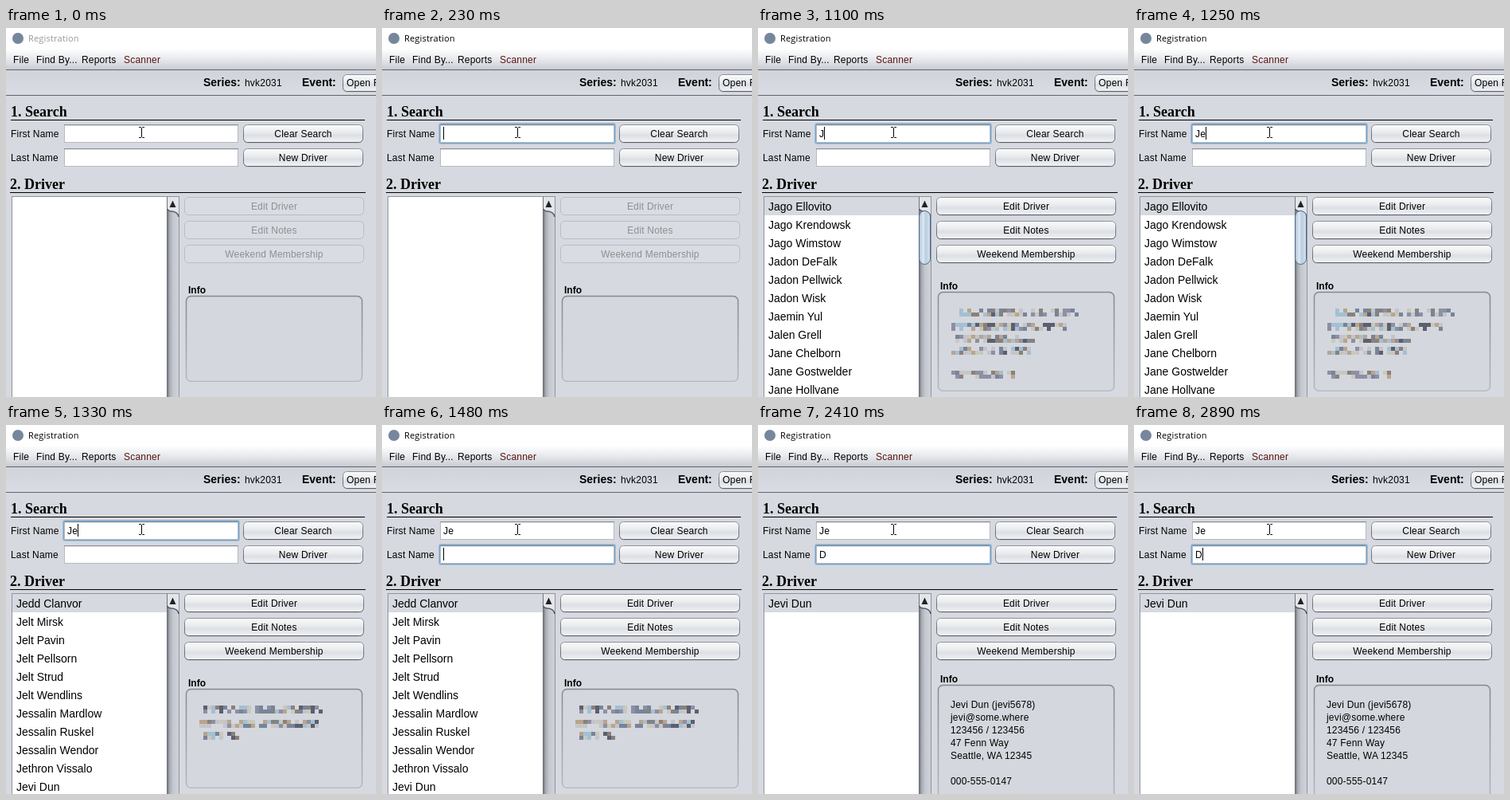
Animation, 465 px wide and 463 px high, one loop 3190 ms. Source, as an HTML page:

```html
<!DOCTYPE html>
<html lang="en">
<head>
<meta charset="utf-8">
<title>Registration</title>
<style>
html, body { margin: 0; width: 100%; height: 100%; overflow: hidden; background: #d6d9df; }
svg { display: block; width: 465px; height: 463px; }
text { font: 12px "Liberation Sans", Arial, sans-serif; letter-spacing: .2px; white-space: pre; }
.title { font: 11px "Open Sans", "Noto Sans", sans-serif; }
.big { font-size: 14px; letter-spacing: 0; }
.bold { font-weight: bold; letter-spacing: 0; }
.head { font: bold 18px "Liberation Serif", Times, serif; letter-spacing: 0; }
.mid { text-anchor: middle; }
.off { fill: #8e8f91; }

/* every change is a hard cut inside one 3190 ms loop */
.a { animation: 3190ms step-end infinite; }
.title { animation-name: title; }
.ring1 { animation-name: ring1; }
.ring2 { animation-name: ring2; }
.caret { animation-name: caret; }
.found { animation-name: found; }
.empty { animation-name: empty; }
.second { animation-name: second; }
.last { animation-name: last; }
.wide { animation-name: wide; }
.narrow { animation-name: narrow; }
.frame { animation-name: frame; }
.label { animation-name: label; }
@keyframes title { 0% { fill: #999 } 7.21%, 100% { fill: #000 } }
@keyframes ring1 { 0% { opacity: 0 } 7.21% { opacity: 1 } 46.394%, 100% { opacity: 0 } }
@keyframes ring2 { 0% { opacity: 0 } 46.394%, 100% { opacity: 1 } }
@keyframes found { 0% { opacity: 0 } 34.482%, 100% { opacity: 1 } }
@keyframes empty { 0% { opacity: 1 } 34.482%, 100% { opacity: 0 } }
@keyframes second { 0% { opacity: 0 } 39.184%, 100% { opacity: 1 } }
@keyframes last { 0% { opacity: 0 } 58.934%, 100% { opacity: 1 } }
@keyframes wide { 0% { opacity: 0 } 34.482% { opacity: 1 } 41.692%, 100% { opacity: 0 } }
@keyframes narrow { 0% { opacity: 0 } 41.692% { opacity: 1 } 58.934%, 100% { opacity: 0 } }
@keyframes caret {
  0% { opacity: 0; transform: translate(77px, 124px) }
  7.21% { opacity: 1; transform: translate(77px, 124px) }
  21.943% { opacity: 0; transform: translate(77px, 124px) }
  34.482% { opacity: 1; transform: translate(83px, 124px) }
  39.184% { opacity: 1; transform: translate(90px, 124px) }
  46.394% { opacity: 1; transform: translate(77px, 154px) }
  58.934% { opacity: 1; transform: translate(86px, 154px) }
  75.548% { opacity: 0; transform: translate(86px, 154px) }
  90.595%, 100% { opacity: 1; transform: translate(86px, 154px) }
}
@keyframes frame {
  0% { y: 336.5px; height: 107px }
  34.482% { y: 331.5px; height: 124px }
  58.934%, 100% { y: 326.5px; height: 150px }
}
@keyframes label {
  0% { transform: none }
  34.482% { transform: translateY(-5px) }
  58.934%, 100% { transform: translateY(-10px) }
}
</style>
</head>
<body>
<svg viewBox="0 0 465 463">
  <defs>
    <linearGradient id="menu" x2="0" y2="1">
      <stop stop-color="#fdfdfe"/><stop offset=".5" stop-color="#e6e8ec"/><stop offset="1" stop-color="#c9ccd2"/>
    </linearGradient>
    <linearGradient id="bar" x2="0" y2="1">
      <stop stop-color="#d0d3d9"/><stop offset="1" stop-color="#d9dce2"/>
    </linearGradient>
    <linearGradient id="btn" x2="0" y2="1">
      <stop stop-color="#fbfbfc"/><stop offset=".45" stop-color="#e8eaed"/>
      <stop offset=".6" stop-color="#dcdfe4"/><stop offset="1" stop-color="#f1f3f6"/>
    </linearGradient>
    <linearGradient id="edge" x2="0" y2="1">
      <stop stop-color="#8f9298"/><stop offset="1" stop-color="#5c5f65"/>
    </linearGradient>
    <linearGradient id="sunk" x2="0" y2="1">
      <stop stop-color="#85888e"/><stop offset="1" stop-color="#b4b7bd"/>
    </linearGradient>
    <linearGradient id="track">
      <stop stop-color="#747880"/><stop offset=".2" stop-color="#a9adb5"/>
      <stop offset=".5" stop-color="#c5c8cf"/><stop offset="1" stop-color="#cfd2d8"/>
    </linearGradient>
    <linearGradient id="thumb">
      <stop stop-color="#a9bed2"/><stop offset=".35" stop-color="#dde8f2"/>
      <stop offset=".6" stop-color="#bacde0"/><stop offset="1" stop-color="#d6e4f1"/>
    </linearGradient>
  </defs>

  <rect width="465" height="463" fill="#d6d9df"/>
  <rect width="465" height="27" fill="#fff"/>
  <circle cx="15" cy="13" r="7" fill="#76869d"/>
  <text class="title a" x="28" y="17">Registration</text>

  <rect y="27" width="465" height="25" fill="url(#menu)"/>
  <rect y="52" width="465" height="1" fill="#62656b"/>
  <text x="9" y="44">File</text>
  <text x="38" y="44">Find By...</text>
  <text x="95" y="44">Reports</text>
  <text x="148" y="44" fill="#5a1512">Scanner</text>

  <rect y="53" width="465" height="31" fill="url(#bar)"/>
  <rect y="84" width="465" height="1" fill="#62656b"/>
  <text class="big bold" x="248" y="73">Series:</text>
  <text x="300" y="73">hvk2031</text>
  <text class="big bold" x="372" y="73">Event:</text>

  <text class="head" x="6" y="111">1. Search</text>
  <rect x="6" y="115" width="445" height="1"/>
  <text x="6" y="137">First Name</text>
  <text x="6" y="167">Last Name</text>
  <text class="head" x="5" y="202">2. Driver</text>
  <rect x="5" y="206" width="447" height="1"/>

  <g id="widgets"></g>

  <text class="found a" x="77" y="137">J</text>
  <text class="second a" x="83.2" y="137">e</text>
  <text class="last a" x="77" y="167">D</text>
  <rect class="caret a" width="1" height="16"/>
  <path d="M167 124.5h2.5l1 1l1 -1h2.5M170.5 125.5v11M167 137.5h2.5l1 -1l1 1h2.5" fill="none" stroke="#000"/>

  <!-- driver list -->
  <rect x="7.5" y="211.5" width="210" height="260" fill="#fff" stroke="#8f949d"/>
  <rect class="found a" x="8" y="212" width="195" height="23" fill="#d6d9df"/>
  <rect x="203" y="212" width="14" height="251" fill="url(#track)"/>
  <rect x="202" y="212" width="1" height="251" fill="#70747c"/>
  <path d="M203 212H217V237Q216 230.5 208 230Q203 229.5 203 226Z" fill="#e3e5ea"/>
  <path d="M203 227Q203 229.5 208 230Q216 230.5 217 237" fill="none" stroke="#565a61" stroke-width="1.5"/>
  <path d="M205.500 225L209.5 216.5L213.500 225Z" fill="#222"/>
  <rect class="wide a" x="202.5" y="229.5" width="14" height="67" rx="7" fill="url(#thumb)" stroke="#4d6885"/>
  <g id="lists"></g>

  <!-- info panel -->
  <text class="label a bold" x="229" y="333">Info</text>
  <g transform="translate(0 1)">
    <rect class="frame a" x="226.5" width="221" rx="6" fill="none" stroke="#e6e8ec"/>
  </g>
  <rect class="frame a" x="226.5" width="221" rx="6" fill="#d4d7dd" stroke="url(#sunk)" stroke-width="1.5"/>
  <g id="info"></g>
</svg>

<script>
const put = (id, html) => { document.getElementById(id).innerHTML = html; };
const group = (cls, html) => `<g class="${cls} a">${html}</g>`;
const lines = (rows, x, y, step, cls = "") =>
  rows.map((s, i) => s && `<text class="${cls}" x="${x}" y="${y + i * step}">${s}</text>`).join("");

function plate(x, y, w, h, off) {
  const box = `x="${x + .5}" y="${y + .5}" width="${w - 1}" height="${h - 1}" rx="5"`;
  return off
    ? `<rect ${box} fill="#d9dce2" stroke="#b9bcc3"/>`
    : `<rect x="${x + 1}" y="${y + 2}" width="${w - 2}" height="${h - 1}" rx="5" fill="#c6c9cf"/>
       <rect ${box} fill="url(#btn)" stroke="url(#edge)"/>`;
}

const button = (x, y, w, text, off) => plate(x, y, w, 23, off) +
  `<text class="mid ${off ? "off" : ""}" x="${x + w / 2}" y="${y + 16}">${text}</text>`;

function field(y, ring) {
  const glow = (d, alpha) => `<rect x="${73.5 - d}" y="${y + .5 - d}" width="${218 + 2 * d}"
    height="${22 + 2 * d}" rx="${d}" fill="none" stroke="#73a4d1" stroke-opacity="${alpha}"/>`;
  return `<rect x="73.5" y="${y + .5}" width="218" height="22" fill="#fff" stroke="#b7bac0"/>
    <path d="M73 ${y + .5}H292" stroke="#8b8e94"/><path d="M74 ${y + 1.5}H291" stroke="#dfe1e4"/>` +
    group(ring, glow(1, 1) + glow(2, .5));
}

const actions = ["Edit Driver", "Edit Notes", "Weekend Membership"];
const actionSet = off => actions.map((s, i) => button(224, 212 + 30 * i, 226, s, off)).join("");

put("widgets",
  plate(423, 58, 80, 22) + '<text x="428" y="73">Open Run</text>' +
  field(121, "ring1") + field(151, "ring2") +
  button(298, 121, 151, "Clear Search") + button(298, 151, 151, "New Driver") +
  group("empty", actionSet(true)) + group("found", actionSet(false)));

const names = {
  wide: ["Jago Ellovito", "Jago Krendowsk", "Jago Wimstow", "Jadon DeFalk", "Jadon Pellwick", "Jadon Wisk",
    "Jaemin Yul", "Jalen Grell", "Jane Chelborn", "Jane Gostwelder", "Jane Hollvane"],
  narrow: ["Jedd Clanvor", "Jelt Mirsk", "Jelt Pavin", "Jelt Pellsorn", "Jelt Strud", "Jelt Wendlins",
    "Jessalin Mardlow", "Jessalin Ruskel", "Jessalin Wendor", "Jethron Vissalo", "Jevi Dun"],
  last: ["Jevi Dun"]
};
put("lists", Object.entries(names).map(([cls, rows]) => group(cls, lines(rows, 13, 229, 23, "big"))).join(""));

// blurred-out details: rows of 5px tiles, each row is [x, y, tiles]
const tones = ["#8d8fa5", "#b9a48c", "#77849a", "#c3c5cb", "#5c5f70", "#a3c0d4", "#8b8079", "#c9c8bd"];
function mosaic(rows, seed) {
  const rnd = () => (seed = seed * 16807 % 2147483647) / 2147483647;
  let out = "";
  for (const [x, y, n] of rows)
    for (let i = 0; i < n; i++)
      for (let j = 0; j < 2; j++)
        if (rnd() < .75)
          out += `<rect x="${x + i * 5}" y="${y + j * 5}" width="5" height="5" fill="${tones[rnd() * 8 | 0]}"/>`;
  return out;
}

put("info",
  group("wide", mosaic([[253, 352, 30], [243, 370, 29], [243, 385, 21], [243, 400, 20], [243, 430, 16]], 4711)) +
  group("narrow", mosaic([[248, 352, 8], [288, 352, 4], [313, 352, 17], [243, 370, 30], [243, 385, 10]], 977)) +
  group("last", lines(["Jevi Dun (jevi5678)", "jevi@some.where", "123456 / 123456", "47 Fenn Way",
    "Seattle, WA 12345", "", "000-555-0147"], 242, 355, 16)));
</script>
</body>
</html>
```
